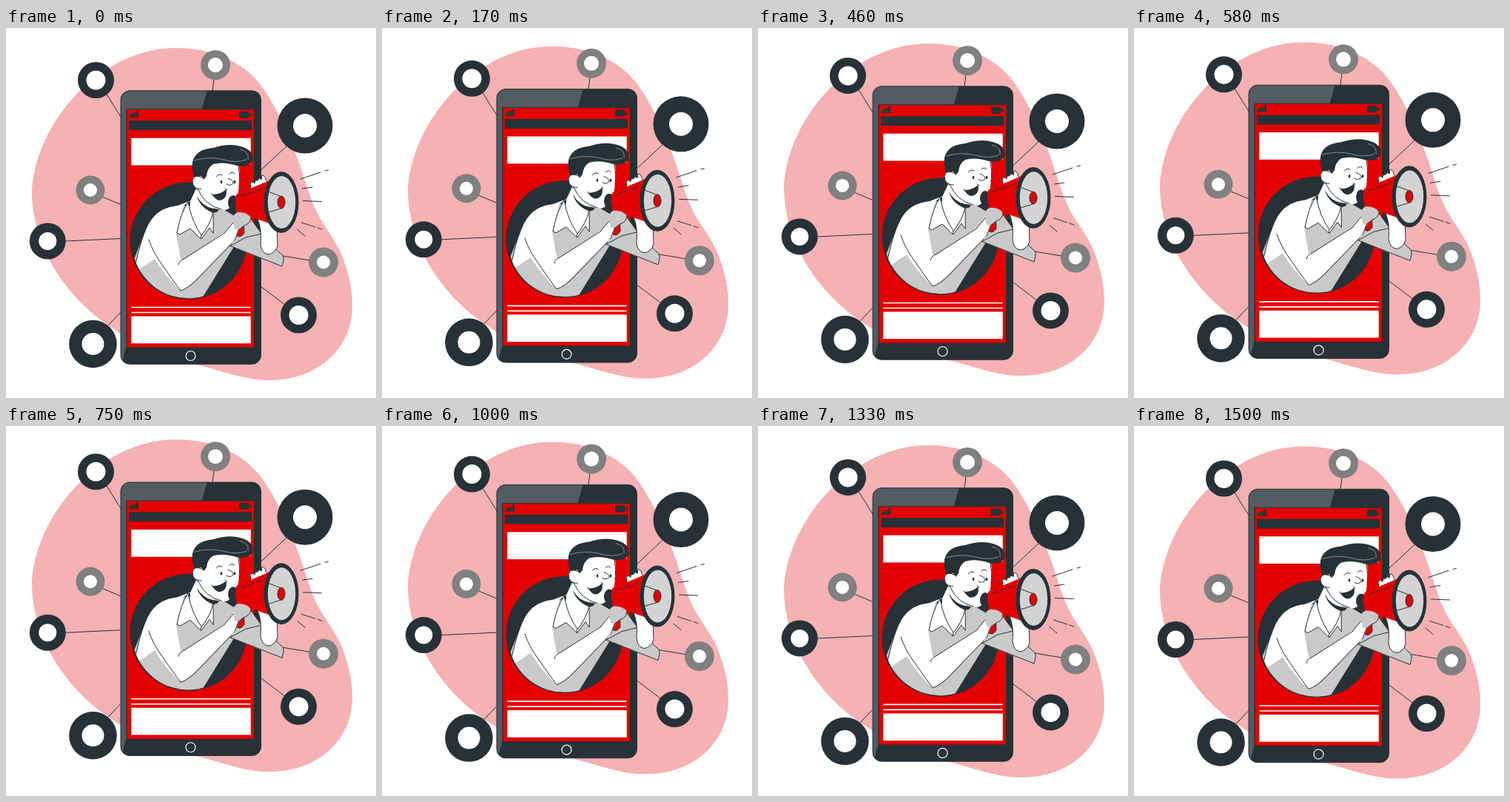
Recreate the animation shown at these times as an HTML page. Size 500 by 500 pixels, loop 1540 ms.

```html
<!DOCTYPE html>
<html lang="en">
<head>
<meta charset="utf-8">
<title>Social media announcement</title>
<style>
html, body { margin: 0; width: 100%; height: 100%; overflow: hidden; background: #fff; }
svg { display: block; width: 100vw; height: 100vh; }
.dark { fill: #263238; }
.red { fill: #e30000; }
.white { fill: #fff; }
.grey { fill: #c9c9c9; }
.line { fill: none; }
.line, .ink { stroke: #263238; stroke-width: 1; stroke-linecap: round; stroke-linejoin: round; }
</style>
</head>
<body>
<svg viewBox="0 0 500 500">
<defs>
  <clipPath id="porthole"><path d="M150 140H400V330H325L310 331A76 76 0 0 1 170.500 287.500L150 287Z"/></clipPath>
  <clipPath id="body"><rect x="155" y="84.800" width="189.500" height="369.400" rx="12"/></clipPath>
</defs>
<g id="scene">
  <path fill="#f6b1b3" d="M230 27C270 27 313 40 341 73C364 102 383 146 398 188C409 222 415 243 428 263C438 279 445 288 452 303C463 329 468 352 468 376C468 430 425 476 355 476C322 476 292 463 258 455C205 446 165 421 130 396C75 355 35 290 35 220C40 129 126 27 230 27Z"/>
  <g id="links" class="line"></g>

  <g id="phone">
    <rect class="dark" x="155" y="84.800" width="189.500" height="369.400" rx="12"/>
    <path clip-path="url(#body)" fill="#535c61" d="M155 84H272L264.500 110H163V429L157 452H155Z"/>
    <rect class="line" x="155" y="84.800" width="189.500" height="369.400" rx="12"/>
    <rect class="red ink" x="163.300" y="109.800" width="172.200" height="322.200"/>
    <path class="dark" d="M167 117h2.500v4h-2.500zM170 115.500h2.500v5.500h-2.500zM173 114h2.500v7h-2.500zM176 112h3v9h-3zM315 112.800h13v9h-13zM328.500 115h2v4.500h-2zM331 116h1v3h-1z"/>
    <rect class="dark" x="166" y="125.200" width="166" height="12.800"/>
    <rect class="white" x="169.300" y="148.700" width="161.400" height="36.800"/>
    <rect class="white" x="169.300" y="389.500" width="161.400" height="36.700"/>
    <path stroke="#fff" stroke-width="1.700" d="M169.300 377.500H330.700M169.300 384.500H330.700"/>
    <circle cx="249.500" cy="443" r="6.500" fill="none" stroke="#fff" stroke-width="1.200"/>
  </g>

  <circle class="dark" cx="246.500" cy="287.500" r="79"/>
  <path class="red" d="M316 184H330.700V262H310Z"/>

  <g id="torso" clip-path="url(#porthole)">
    <path class="grey" d="M170 320L190 270L240 240L285 240L312 256L328 275L309 294L260 373H220Z"/>
    <path class="white" d="M250 233L232 240C209 243 199 252 190 270C183 286 176 306 176 329L201 312Q216 337 236 355Q244 352 256 340L309 286L297 275L240 313L236 312L230 278L240 240Z"/>
    <path class="line" d="M246 234C213 242 204 245 193 263C184 281 179 302 176 315M193 286Q199 304 211 320Q226 342 236 355Q246 352 258 340L309 287M233 320Q233 315 242 311L297 276"/>
  </g>

  <g id="farArm">
    <path class="grey" d="M304 295L312 268L331 259L345 278L370 304L346 312Z"/>
    <path class="grey ink" d="M303 294.500L324 283L345 278L370 304Q376 307 375 314L373 322Q340 309 303 294.500Z"/>
    <path class="white ink" d="M340 258Q346 272 344 292Q345 304 354 306Q364 305 367 294L366 265Z"/>
  </g>

  <g id="neck">
    <path class="white" d="M257 217L249 234L248 258L263 281L280 256L281 237Z"/>
    <path class="dark" d="M258 227Q265 241 280 244L288 245Q285 251 278 249Q262 242 258 227Z"/>
    <path class="white ink" d="M246 235Q236 250 231 277L235 279L249 271L263 285L264 280Q251 262 246 235Z"/>
    <path class="white ink" d="M280 249Q276 266 263 282L264 285L275 270L280 277Z"/>
  </g>

  <g id="head">
    <path class="white" d="M262 200L272 180H314Q318 200 314 220Q312 240 297 246Q272 244 259 224Z"/>
    <path class="line" d="M314 186Q317 200 315 214M260 219Q268 239 291 245"/>
    <path class="white ink" d="M265 202Q254 197 252 206Q252 218 264 218"/>
    <path class="dark" d="M254 201Q251 191 252 181Q256 164 280 162Q304 154 323 162Q336 168 333 180Q327 189 312 186Q294 180 280 184Q272 189 271 200L267 205L264 200Z"/>
    <path fill="none" stroke="#aeb3b6" stroke-width=".7" d="M254 179Q274 173 294 178Q311 183 325 178M316 164Q329 167 327 178"/>
    <path class="line" d="M284 201Q288 196 292 199M302 197Q306 193 309 197M300 203Q308 206 307 210Q303 214 298 211"/>
    <ellipse class="dark" cx="291" cy="208" rx="1.300" ry="2.300"/>
    <ellipse class="dark" cx="309" cy="208" rx="1.300" ry="2.300"/>
    <path class="dark" d="M279.500 225Q290 225 297.500 218Q299 226 295 230Q291 234 286 232.500Q281 230 279.500 225Z"/>
    <path class="line" d="M278 223.500L280 227M296 217L299 219"/>
  </g>

  <g id="megaphone">
    <path class="white ink" d="M331 218L330 210Q333 206 336 210Q336 205 340 206Q342 201 345 205L346 199Q350 199 351 205L356 211L347 220Z"/>
    <path class="red ink" d="M311 250L321 252L322 277Q316 286 310 279Z"/>
    <ellipse class="dark" cx="307" cy="236" rx="7" ry="10"/>
    <path class="red" d="M311 225L356 206V264L313 249Q308 237 311 225Z"/>
    <path class="line" stroke-dasharray="8 3" d="M317 227L350 216"/>
    <ellipse class="dark" cx="372" cy="235.500" rx="23.500" ry="41.500"/>
    <ellipse fill="#d3d3d3" cx="372.500" cy="235.500" rx="18.700" ry="35.500"/>
    <path class="line" d="M354 221L370 227M355 249L371 244"/>
    <ellipse class="red ink" cx="372" cy="235.500" rx="5" ry="8.500"/>
    <path class="white" d="M296 276L307 262L316 270L309 287Z"/>
    <path class="grey" d="M307 263Q305 252 313 249Q325 248 331 256Q331 264 322 267L314 273L309 272Z"/>
    <path class="line" d="M296 276L307 263M309 287L314 273L322 267Q331 264 331 256"/>
  </g>

  <path class="line" d="M398 204L425 195M431 193L435.500 192M400.500 217L414 215M401.500 233.500L426.500 234.500M399.500 263L418 269M421 270L427 272M394 272.500L404 281"/>
  <g id="badges"></g>
</g>
</svg>
<script>
const NS = 'http://www.w3.org/2000/svg';
const byId = id => document.getElementById(id);
const add = (parent, tag, attrs) => {
  const el = document.createElementNS(NS, tag);
  for (const key in attrs) el.setAttribute(key, attrs[key]);
  parent.append(el);
};

const DARK = '#263238', GREY = '#808080';
// centre x, centre y, radius, fill, mark radius, link
const badges = [
  [121.5, 70.5, 24.5, DARK, 13, 'M135 88L156 121.500'],
  [283, 50, 20, GREY, 10, 'M281 69L279 85'],
  [404, 132, 37.5, DARK, 16, 'M381 158L344 192.500'],
  [114, 219, 19.5, GREY, 9, 'M131 228.500L156 239'],
  [56.3, 288, 24.5, DARK, 12, 'M80 288L156 284.500'],
  [117.5, 427, 32.3, DARK, 15, 'M136 404L156 383'],
  [429, 316.5, 20, GREY, 9, 'M410 314L374 308'],
  [395.5, 388, 24.5, DARK, 13, 'M377 374L344 349']
];
for (const [cx, cy, r, fill, mark, d] of badges) {
  add(byId('links'), 'path', { d });
  add(byId('badges'), 'circle', { cx, cy, r, fill });
  add(byId('badges'), 'circle', { cx, cy, r: mark, fill: '#fff' });
}

// Linear float: [time in ms, vertical offset]
const LOOP = 1540, STEP = 1000 / 24;
const track = [[0, 0], [708, -9.3], [1450, 0.5], [LOOP, 0.5]];
const offsetAt = t => {
  const i = track.findIndex(([time]) => time > t);
  const [t0, y0] = track[i - 1], [t1, y1] = track[i];
  return y0 + (y1 - y0) * (t - t0) / (t1 - t0);
};

const scene = byId('scene');
const start = performance.now();
function draw() {
  const t = (performance.now() - start) % LOOP;
  const tick = Math.min(36, Math.floor((t + 5) / STEP));
  scene.setAttribute('transform', `translate(0 ${offsetAt(tick * STEP).toFixed(2)})`);
  requestAnimationFrame(draw);
}
draw();
</script>
</body>
</html>
```
